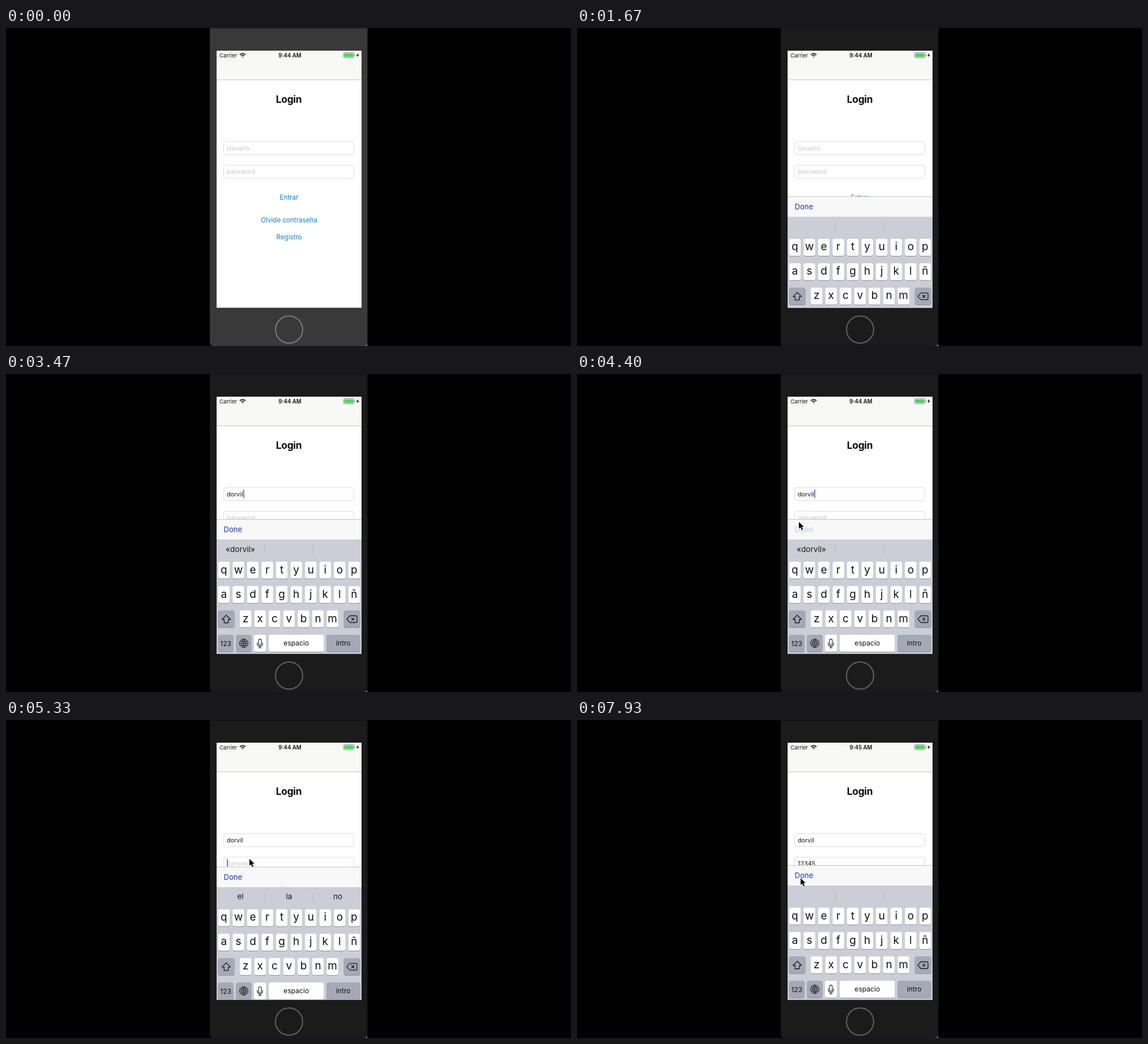
Animation, 998 px wide and 561 px high, one loop 8 s. Source, as an HTML page with a canvas:

```html
<!DOCTYPE html>
<html lang="es">
<head>
<meta charset="utf-8">
<title>Login</title>
<style>
  html, body { margin: 0; height: 100%; overflow: hidden; background: #000; }
  canvas { display: block; }
</style>
</head>
<body>
<canvas id="stage" width="998" height="561"></canvas>
<script>
const ctx = document.getElementById('stage').getContext('2d');
const LOOP = 8000;
const USER = 'dorvil', PASSWORD = '12345';
const PASSWORD_TIMES = [6050, 6250, 6450, 6650, 7100];
const KEYBOARD_TOP = 256, KEYBOARD_TRAVEL = 238;
const BLUE = '#1c35d2';

// Pointer tracks: [time, x, y]; each track is visible until its end time.
const pointerTracks = [
  { end: 1270, points: [[270, 431, 115], [1070, 541, 206]] },
  { end: LOOP, points: [[3650, 568, 209], [4020, 366, 251], [4260, 392, 261], [4620, 392, 261],
    [4900, 430, 245], [7600, 430, 245], [7800, 391, 291], [7930, 395, 279]] }
];

const clamp = v => Math.max(0, Math.min(1, v));
const ramp = (t, from, to) => clamp((t - from) / (to - from));
const smooth = p => p * p * (3 - 2 * p);

// Critically damped spring: 1 at the start, settling to 0.
function spring(ms) {
  const x = Math.max(0, ms) * 0.01826;
  return Math.exp(-x) * (1 + x);
}

function text(str, x, y, size, color = '#111', align = 'center', weight = 400) {
  ctx.font = `${weight} ${size}px Inter, sans-serif`;
  ctx.textAlign = align;
  ctx.fillStyle = color;
  ctx.fillText(str, x, y);
}

function rect(x, y, w, h, color) {
  ctx.fillStyle = color;
  ctx.fillRect(x, y, w, h);
}

function round(x, y, w, h, r, fill, stroke) {
  ctx.beginPath();
  ctx.roundRect(x, y, w, h, r);
  if (fill) { ctx.fillStyle = fill; ctx.fill(); }
  if (stroke) { ctx.strokeStyle = stroke; ctx.stroke(); }
}

function icon(path, x, y, width = 1.3, fill) {
  ctx.save();
  ctx.translate(x, y);
  ctx.lineWidth = width;
  ctx.lineJoin = 'round';
  ctx.strokeStyle = '#191b1f';
  const shape = new Path2D(path);
  if (fill) { ctx.fillStyle = fill; ctx.fill(shape); }
  if (width) ctx.stroke(shape);
  ctx.restore();
}

function drawDevice(active) {
  rect(0, 0, 998, 561, '#000');
  rect(630, 555, 8, 6, '#999');
  round(360, 0, 278.5, 561, [0, 0, 6, 6], active ? '#1b1b1b' : '#393939');
  rect(360, 0, 278.5, 1, active ? '#0d0d0d' : '#222');
  ctx.beginPath();
  ctx.arc(500, 532, 24, 0, 7);
  ctx.lineWidth = 2;
  ctx.strokeStyle = active ? '#626262' : '#7d7d7a';
  ctx.stroke();
  ctx.lineWidth = 1;
}

function drawStatusBar(t) {
  rect(372, 40, 256, 51, '#f8f8f7');
  rect(372, 91, 256, 1, '#c6c6c4');
  text('Carrier', 377, 51.5, 9.5, '#111', 'left');
  text(t < 7130 ? '9:44 AM' : '9:45 AM', 501.5, 51.5, 9.7, '#111', 'center', 600);

  ctx.strokeStyle = '#111';
  ctx.lineWidth = 1.7;
  for (const r of [1, 4, 7]) {
    ctx.beginPath();
    ctx.arc(418, 52, r, -Math.PI * 0.75, -Math.PI * 0.25);
    ctx.stroke();
  }
  ctx.lineWidth = 1;
  round(596, 43.5, 19, 9, 2, '#f8f8f7', '#999');
  round(597.3, 44.8, 16.4, 6.4, 1, '#4cd55f');
  round(615.8, 46.5, 1.3, 3, 0.6, '#999');
  icon('M1 -4 L-2.4 .7 H-.3 L-1 4 L2.4 -.8 H.3Z', 621.3, 48, 0, '#111');
}

function drawField(y, value, placeholder, caretAlpha) {
  round(384.5, y + 0.5, 230, 23, 4, '#fff', '#dedede');
  text(value || placeholder, 390, y + 15.8, 10.8, value ? '#151515' : '#c5c5c8', 'left');
  const caretX = value ? 390.5 + ctx.measureText(value).width : 390.3;
  ctx.globalAlpha = caretAlpha;
  rect(caretX, y + 4, 1.5, 15, '#3456d8');
  ctx.globalAlpha = 1;
}

function drawKey(x, y, w, label, size = 12.1, dark = false, baseline = 19) {
  round(x, y + 1, w, 30, 3.5, '#8d9097');
  round(x, y, w, 30, 3.5, dark ? '#a4a9b5' : '#fff');
  if (label) text(label, x + w / 2, y + baseline, size, '#111');
}

function drawKeyboard(top, words, doneAlpha) {
  rect(372, top, 256, 36, '#f8f8f8');
  rect(372, top, 256, 1, '#c4c5c6');
  ctx.globalAlpha = doneAlpha;
  text('Done', 384.5, top + 22.7, 13.1, BLUE, 'left');
  ctx.globalAlpha = 1;
  rect(372, top + 36, 256, 202, '#cbced6');

  words.forEach((word, i) => text(word, 414 + i * 86, top + 57.5, 13.6, '#15171a'));
  rect(456, top + 46, 1, 16, '#b3b7c0');
  rect(542, top + 46, 1, 16, '#b3b7c0');

  const rows = [['qwertyuiop', 0], ['asdfghjklñ', 0], ['zxcvbnm', 1.5]];
  rows.forEach(([letters, indent], row) => [...letters].forEach((letter, i) =>
    drawKey(374.6 + (i + indent) * 25.56, top + 75 + row * 43, 20.6, letter, 19, false, 20.5)));

  const third = top + 161, fourth = top + 204;
  drawKey(374.5, third, 29, '', 0, true);
  drawKey(596.7, third, 28.8, '', 0, true);
  icon('M0 -7 L7.5 .5 H3.7 V6.5 H-3.7 V.5 H-7.5Z', 389, third + 15.5);
  icon('M-9 0 L-3.5 -6 H7 Q9 -6 9 -4 V4 Q9 6 7 6 H-3.5Z M-1 -2.6 L4.4 2.6 M4.4 -2.6 L-1 2.6',
    611, third + 15.5);

  drawKey(374.5, fourth, 27.3, '123', 12.1, true, 20);
  drawKey(406.3, fourth, 27.3, '', 0, true);
  drawKey(438, fourth, 21.5, '');
  drawKey(464, fourth, 97.5, 'espacio');
  drawKey(566, fourth, 59.5, 'intro', 12.1, true);
  icon('M-7.5 0 A7.5 7.5 0 1 1 7.5 0 A7.5 7.5 0 1 1 -7.5 0 H7.5 M0 -7.5 V7.5' +
    'M0 -7.5 Q-7.5 0 0 7.5 Q7.5 0 0 -7.5 M-6.2 -4 Q0 -1.8 6.2 -4 M-6.2 4 Q0 1.8 6.2 4',
    420, fourth + 15, 1);
  icon('M-2.4 -5 A2.4 2.4 0 0 1 2.4 -5 V1 A2.4 2.4 0 0 1 -2.4 1Z' +
    'M-4.7 -1.5 V1 A4.7 4.7 0 0 0 4.7 1 V-1.5 M0 5.7 V8 M-2.7 8 H2.7', 448.5, fourth + 15, 1.1);
}

function drawPointer(t) {
  const track = pointerTracks.find(({ end, points }) => t >= points[0][0] && t < end);
  if (!track) return;
  const { points } = track;
  let [, x, y] = points[points.length - 1];
  const next = points.findIndex(p => p[0] > t);
  if (next > 0) {
    const [t0, x0, y0] = points[next - 1], [t1, x1, y1] = points[next];
    const p = smooth(ramp(t, t0, t1));
    x = x0 + (x1 - x0) * p;
    y = y0 + (y1 - y0) * p;
  }
  ctx.save();
  ctx.translate(x, y);
  ctx.beginPath();
  for (const [px, py] of [[0, 0], [0, 12], [2.8, 9.6], [5, 14.5], [7, 13.6], [4.9, 8.8], [8.6, 8.6]])
    ctx.lineTo(px, py);
  ctx.closePath();
  ctx.lineWidth = 1.4;
  ctx.strokeStyle = '#fff';
  ctx.stroke();
  ctx.fillStyle = '#000';
  ctx.fill();
  ctx.restore();
}

function keyboardOffset(t) {
  if (t < 4450) return spring(t - 1496);
  if (t < 4980) return 1 - spring(t - 4450);
  return spring(t - 4980);
}

function suggestions(t, user, password) {
  if (t < 1850 || t >= 7230) return [];
  const typed = t < 4980 ? user : password;
  return typed ? [`«${typed}»`] : ['el', 'la', 'no'];
}

function userCaret(t) {
  if (t < 2730) return ramp(t, 1750, 1850) * (1 - ramp(t, 2320, 2465));
  return t < 4450 ? 1 : 0;
}

function passwordCaret(t) {
  if (t < 4990) return 0;
  if (t < 6050) return 1 - ramp(t, 5500, 5640) + ramp(t, 5900, 6040);
  return 1 - ramp(t, 7590, 7720);
}

function draw(t) {
  const user = USER.slice(0, Math.max(0, Math.floor((t - 2730) / 140) + 1));
  const password = PASSWORD.slice(0, PASSWORD_TIMES.filter(at => t >= at).length);

  drawDevice(t >= 1270);
  ctx.save();
  ctx.beginPath();
  ctx.rect(372, 40, 256, 453.5);
  ctx.clip();
  rect(372, 40, 256, 454, '#fff');
  drawStatusBar(t);
  ctx.letterSpacing = '-0.3px';
  text('Login', 499.5, 132, 17.4, '#0b0b0b', 'center', 700);
  ctx.letterSpacing = '0px';
  drawField(200, user, 'Usuario', userCaret(t));
  drawField(241.5, password, 'password', passwordCaret(t));
  text('Entrar', 500, 302.8, 11.6, '#0d7ce2');
  text('Olvide contraseña', 500, 342.7, 11.6, '#0d7ce2');
  text('Registro', 500, 373, 11.6, '#0d7ce2');

  const offset = keyboardOffset(t);
  if (offset < 0.999) {
    const pressed = t >= 4330 && t < 4500;
    drawKeyboard(KEYBOARD_TOP + offset * KEYBOARD_TRAVEL, suggestions(t, user, password), pressed ? 0.24 : 1);
  }
  ctx.restore();
  drawPointer(t);
}

function frame() {
  draw(performance.now() % LOOP);
  requestAnimationFrame(frame);
}
frame();
</script>
</body>
</html>
```
